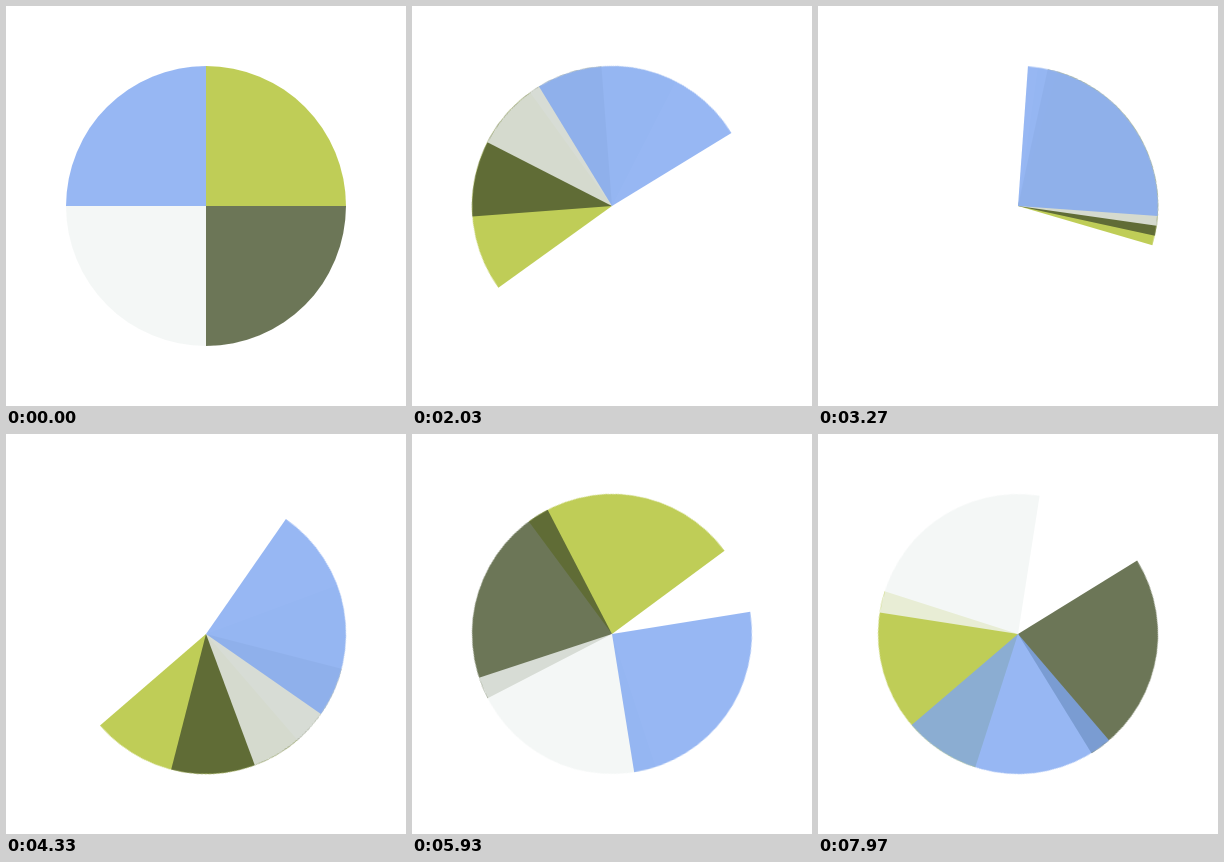
An HTML page for the animation above (8 s loop, 400 px wide and 400 px high).

```html
<!DOCTYPE html>
<html lang="en">
<head>
<meta charset="utf-8">
<title>Turning quarters</title>
<style>
  html, body { margin: 0; width: 100%; height: 100%; overflow: hidden; background: #fff; }
  svg { display: block; width: 100%; height: 100%; }
  path { opacity: .8; transform-origin: 0 0; }
</style>
</head>
<body>
<svg viewBox="0 0 400 400"><g id="wheel" transform="translate(200 200)"></g></svg>
<script>
  const LOOP = 8000, FRAMES = 240;
  const START = -90, STEP = 0.96; // degrees, degrees per frame
  const END = START + STEP * FRAMES;

  // Bottom to top; each quarter turns at a multiple of the base speed.
  const quarters = [
    { color: 'rgb(176,193,45)', speed: 4 },
    { color: 'rgb(72,84,46)', speed: 3 },
    { color: 'rgb(242,245,244)', speed: 2 },
    { color: 'rgb(125,166,240)', speed: 1 }
  ];

  const wheel = document.getElementById('wheel');
  const turn = angle => `rotate(${angle}deg)`;

  for (const { color, speed } of quarters) {
    const path = document.createElementNS('http://www.w3.org/2000/svg', 'path');
    path.setAttribute('d', 'M0 0V-140A140 140 0 0 1 140 0Z');
    path.setAttribute('fill', color);
    wheel.append(path);
    path.animate(
      { transform: [turn(START * speed), turn(END * speed)] },
      { duration: LOOP, iterations: Infinity, easing: `steps(${FRAMES}, end)`, delay: -3.5 }
    );
  }
</script>
</body>
</html>
```
